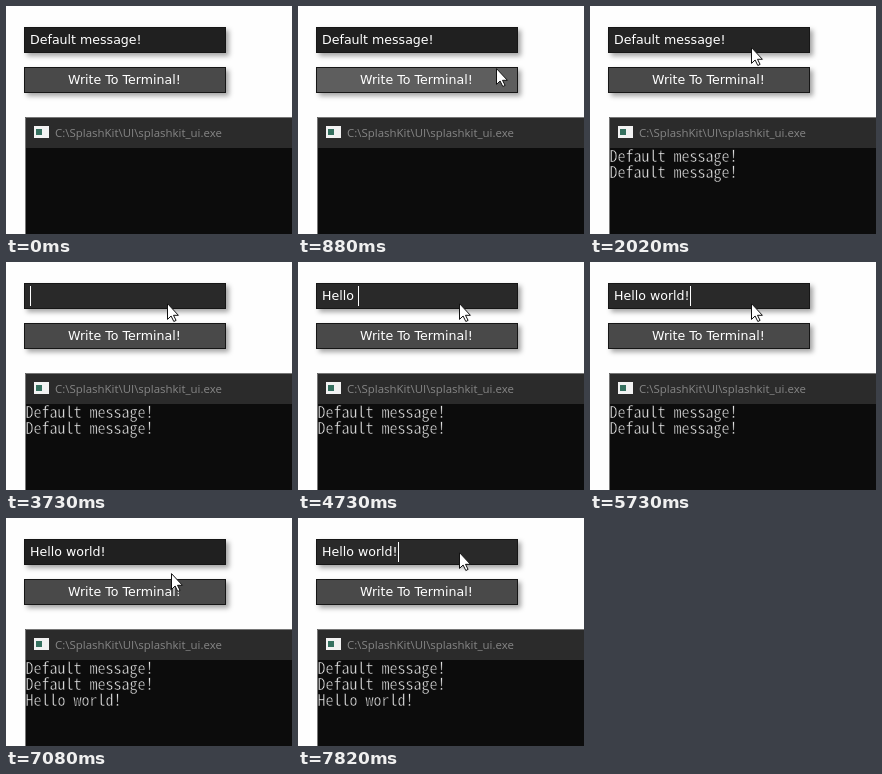
An HTML page that plays this animation: 286x228 px, repeating every 8000 ms.

```html
<!DOCTYPE html>
<html lang="en">
<head>
<meta charset="utf-8">
<title>Write to terminal</title>
<style>
  html, body { margin: 0; width: 100%; height: 100%; overflow: hidden; background: #fefefe; }
  svg { display: block; width: 286px; height: 228px; }
  text { white-space: pre; }
  .ui { font: 12.6px "DejaVu Sans", sans-serif; fill: #fff; }
  .title { font: 11.45px "Open Sans", "Noto Sans", sans-serif; fill: #868686; }
  /* A thin background-coloured outline slims the console letters. */
  .console {
    font: 16px "Noto Sans Mono CJK SC", "Noto Sans Mono CJK JP", "Liberation Mono", monospace;
    fill: #e4e4e4; stroke: #0c0c0c; stroke-width: .4;
  }
  .box { stroke: #161616; filter: drop-shadow(3px 3px 2.5px rgba(0, 0, 0, .36)); }
</style>
</head>
<body>
<svg viewBox="0 0 286 228">
  <rect width="286" height="228" fill="#fefefe"/>

  <rect id="field" class="box" x="18.5" y="21.5" width="201" height="25"/>
  <text id="value" class="ui" x="24" y="38"></text>
  <rect id="caret" y="24" width="1" height="20" fill="#fff"/>

  <rect id="button" class="box" x="18.5" y="61.5" width="201" height="25"/>
  <text class="ui" x="62" y="78">Write To Terminal!</text>

  <rect x="19" y="111" width="267" height="117" fill="#0c0c0c"/>
  <rect x="19" y="111" width="267" height="31" fill="#2b2b2b"/>
  <path d="M19.5 228V111.5H286" fill="none" stroke="#777"/>
  <rect x="28" y="120" width="15" height="12" fill="#f2f2f2"/>
  <rect x="30" y="123" width="6" height="6" fill="#35705f"/>
  <text class="title" x="49" y="131">C:\SplashKit\UI\splashkit_ui.exe</text>
  <g id="output" class="console"></g>

  <path id="pointer" d="M.5 .6V16.4L4.1 13L6.8 18.5L9.1 17.4L6.5 12.3H11.4Z"
        fill="#fff" stroke="#111"/>
</svg>
<script>
const LOOP = 8000;
const FRAME = 68;
const FIRST = "Default message!";
const SECOND = "Hello world!";
const $ = id => document.getElementById(id);

const entry = { x: 262, y: 42 };
const moves = [
  { start: 600, end: 1000, x: 182, y: 67 },
  { start: 1340, end: 1410, x: 188, y: 66 },
  { start: 1750, end: 2020, x: 161, y: 41 },
  { start: 6390, end: 6730, x: 171, y: 66 },
  { start: 7000, end: 7360, x: 149, y: 22 },
  { start: 7690, end: 7820, x: 161, y: 34 }
];
const printed = [
  { start: 1140, text: FIRST },
  { start: 1680, text: FIRST },
  { start: 6860, text: SECOND }
];
const bursts = [
  { start: 4130, end: 4390, count: 3 },
  { start: 4530, end: 4730, count: 3 },
  { start: 5000, end: 5400, count: 5 },
  { start: 5730, end: 5730, count: 1 }
];
const erase = { start: 3240, end: 3730, count: 8 };

// Steps taken so far: the first falls on start, the last on end.
function steps(t, { start, end, count }) {
  if (t < start) return 0;
  if (t >= end) return count;
  return Math.floor((t - start) / (end - start) * (count - 1)) + 1;
}

const ease = p => p * p * (3 - 2 * p);

function pointerAt(t) {
  let { x, y } = entry;
  for (const move of moves) {
    const count = Math.round((move.end - move.start) / FRAME) + 1;
    const p = ease(steps(t, { ...move, count }) / count);
    x += (move.x - x) * p;
    y += (move.y - y) * p;
  }
  return { x: Math.round(x), y: Math.round(y) };
}

function fieldText(t) {
  if (t < 2970) return FIRST;
  if (t < bursts[0].start) {
    const left = FIRST.length - 1 - 2 * steps(t, erase);
    return FIRST.slice(0, Math.max(0, left));
  }
  return SECOND.slice(0, bursts.reduce((n, burst) => n + steps(t, burst), 0));
}

const lines = printed.map(({ start, text }, i) => {
  const el = document.createElementNS("http://www.w3.org/2000/svg", "text");
  el.setAttribute("x", 19.5);
  el.setAttribute("y", 156 + 16 * i);
  el.textContent = text;
  $("output").append(el);
  return { el, start };
});

// Console cells are 8px wide whichever monospace font is available.
const cell = lines[0].el.getComputedTextLength() / FIRST.length;
if (cell) $("output").style.fontSize = 16 * 8 / cell + "px";

function show(el, on) {
  el.setAttribute("visibility", on ? "visible" : "hidden");
}

function draw(t) {
  const { x, y } = pointerAt(t);
  const entered = t >= moves[0].start;
  const over = (top, bottom) => entered && x >= 18 && x < 220 && y >= top && y < bottom;
  const focus = t >= 2220 && t < 6860 || t >= 7490;

  show($("pointer"), entered);
  $("pointer").setAttribute("transform", `translate(${x} ${y})`);

  $("field").setAttribute("fill", focus ? "#292929" : over(21, 47) ? "#242424" : "#202020");
  $("button").setAttribute("fill", over(61, 87) ? "#5e5e5e" : "#494949");

  $("value").textContent = fieldText(t);
  $("caret").setAttribute("x", 24 + Math.ceil($("value").getComputedTextLength()));
  show($("caret"), focus);

  for (const { el, start } of lines) show(el, t >= start);
}

const began = performance.now();
function tick() {
  draw((performance.now() - began) % LOOP);
  requestAnimationFrame(tick);
}
tick();
</script>
</body>
</html>
```
